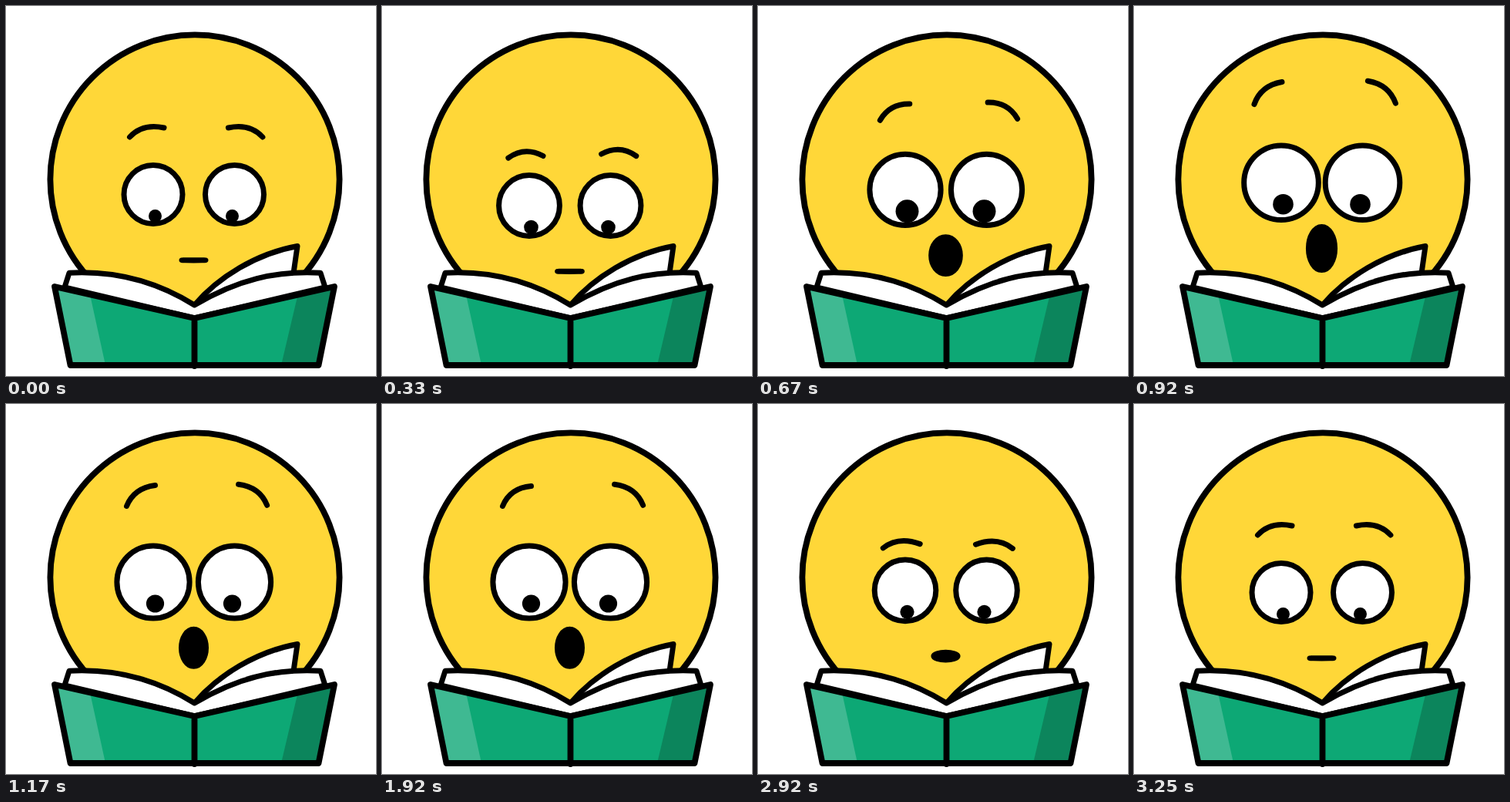
Animation of 480x480 px, one loop 3330 ms. Source, as an HTML page:

```html
<!DOCTYPE html>
<html lang="en">
<head>
<meta charset="utf-8">
<title>Surprised reader</title>
<style>
  html, body { margin: 0; width: 100%; height: 100%; overflow: hidden; background: #fff; }
  svg { display: block; width: 100%; height: 100%; }
  .line { stroke: #000; stroke-width: 7; stroke-linecap: round; stroke-linejoin: round; }
  .bold { stroke-width: 7.8; }
</style>
</head>
<body>
<svg viewBox="0 0 480 480">
  <circle class="line bold" cx="245" cy="225" r="187.6" fill="#ffd738"/>

  <g class="line" fill="none">
    <path id="leftBrow"/>
    <path id="rightBrow"/>
  </g>
  <g id="features">
    <g class="line" fill="#fff">
      <circle class="eye" cx="191"/>
      <circle class="eye" cx="296.5"/>
    </g>
    <circle class="pupil" cx="193.5" cy="28"/>
    <circle class="pupil" cx="293.5" cy="28"/>
    <ellipse id="mouth" class="line" cx="243.5" cy="85.3"/>
  </g>

  <g class="line" fill="#fff">
    <path d="M244.5 388C275 352 325 321 378 311.5L372.5 350Z"/>
    <path d="M76 365L82 346.2C140 343 195 357 244.5 388C300 355 350 343 408 346.2L414 365L244.5 405Z"/>
  </g>
  <path d="M63 364L244.5 405L426 364L405.5 466H83.5Z" fill="#0da875"/>
  <path d="M63 364L109 374.5L129 466H83.5Z" fill="#3fb992"/>
  <path d="M426 364L378.5 375L357 466H405.5Z" fill="#0c855c"/>
  <path class="line bold" d="M244.5 405V467M63 364L244.5 405L426 364L405.5 466H83.5Z" fill="none"/>
</svg>
<script>
const LOOP = 3330;
const FPS = 12;

// Left brow as start, control and end point, with its travel when dipping and gasping.
const brow = {
  rest: [160.5, 170, 177, 152, 205, 158],
  dip:  [4, 33, 9.7, 36.5, 5.8, 44.7],
  gasp: [-4, -37.5, -11, -43, -11.5, -52.5]
};

const byId = id => document.getElementById(id);
const all = selector => [...document.querySelectorAll(selector)];
const set = (el, attrs) => Object.entries(attrs).forEach(([k, v]) => el.setAttribute(k, v));

const ramp = (s, from, to) => Math.min(1, Math.max(0, (s - from) / (to - from)));
const ease = (s, from, to) => {
  const x = ramp(s, from, to);
  return x * x * (3 - 2 * x);
};
const pulse = (s, from, to) => Math.sin(Math.PI * ramp(s, from, to)) ** 2;

function draw(s) {
  const dip = ease(s, 2, 4) - ease(s, 5, 10);
  // Surprise overshoots, then settles at 1.
  const rise = 1.14 * ease(s, 2, 10.6) - 0.14 * ease(s, 10.5, 14);
  const gasp = rise - ease(s, 30, 37);
  // The brows fall past their rest pose and come back.
  const lift = rise - 1.45 * ramp(s, 30, 35) + 0.45 * ease(s, 35, 39);
  const swell = pulse(s, 3, 13);

  byId('features').setAttribute('transform', `translate(0 ${244.5 + 16.6 * dip - 13.5 * gasp})`);
  all('.eye').forEach(el => set(el, { r: 38 + 9.1 * gasp }));
  all('.pupil').forEach(el => set(el, { r: 8.5 + 3.1 * gasp + 3.7 * swell }));
  set(byId('mouth'), {
    rx: 15.5 + 0.5 * gasp + 2.9 * swell,
    ry: Math.max(0.1, 24 * gasp * ease(s, 4, 7) + 2.6 * swell * ease(s, 4, 7))
  });

  const p = brow.rest.map((v, i) => v + brow.dip[i] * dip + brow.gasp[i] * lift);
  const arc = endY => `M${p[0]} ${p[1]}Q${p[2]} ${p[3]} ${p[4]} ${endY}`;
  const sag = 1.5 * (ramp(s, 15, 27) - ramp(s, 30, 31));
  set(byId('leftBrow'), { d: arc(p[5] + sag) });
  set(byId('rightBrow'), {
    d: arc(p[5]),
    transform: `matrix(-1 0 0 1 ${493.4 + 1.7 * lift} ${-1.2 * lift - 2.3 * dip})`
  });
}

const start = performance.now();
function tick() {
  const t = (performance.now() - start) % LOOP;
  draw(Math.floor((t + 4) * FPS / 1000));
  requestAnimationFrame(tick);
}
tick();
</script>
</body>
</html>
```
